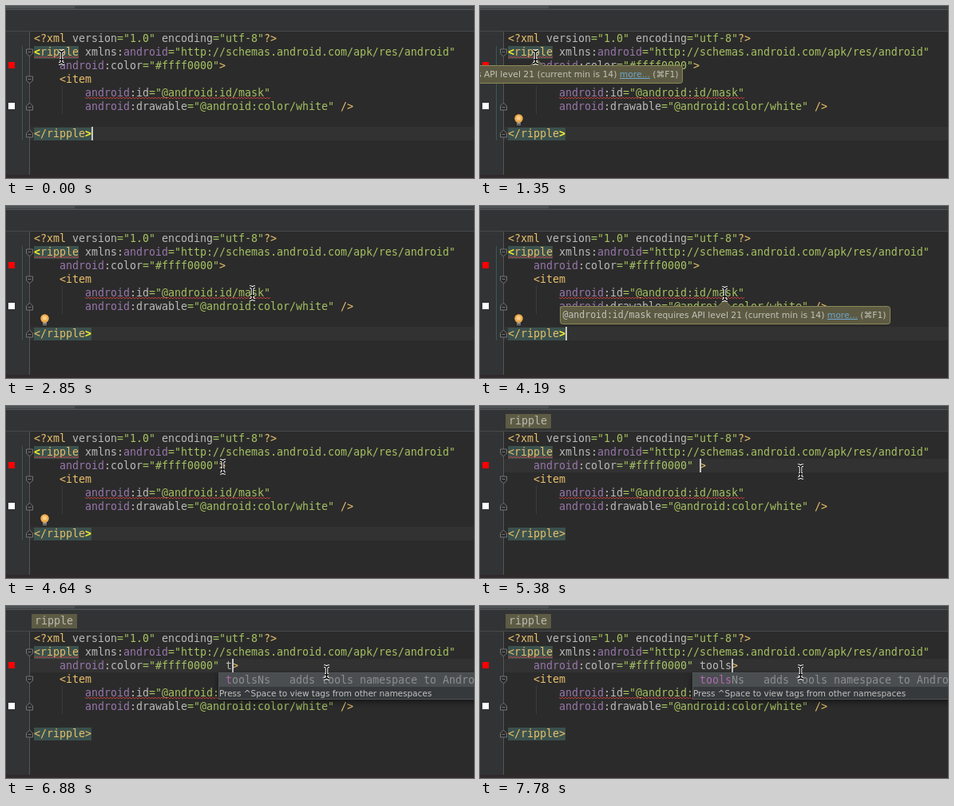
An HTML page with a canvas that plays this animation: 586 by 215 pixels, repeating every 8 s.

```html
<!DOCTYPE html>
<html lang="en">
<head>
<meta charset="utf-8">
<title>Code editor</title>
<style>
  html, body { margin: 0; width: 100%; height: 100%; overflow: hidden; background: #2b2b2b; }
  canvas { display: block; }
</style>
</head>
<body>
<canvas id="stage" width="586" height="215"></canvas>
<script>
const ctx = document.getElementById('stage').getContext('2d');
const LOOP = 8000, CHAR = 8, LEFT = 35, ROW = 17, FIRST_BASELINE = 45;
const mono = size => `${size}px "DejaVu Sans Mono", monospace`;
const sans = size => `${size}px "DejaVu Sans", sans-serif`;
const MONO = mono(13.29), BOLD = 'bold ' + MONO;
const TAG = '#e8bf6a', NS = '#9876aa', NAME = '#bababa', STR = '#a5c261', BRACE = '#ffef28';

const TYPED = [[6880, 't'], [7180, 'o'], [7330, 'o'], [7630, 'l'], [7780, 's']];
const CARET_TOGGLES = [450, 900, 1350, 1950, 2400, 3000, 3450, 3890, 4340, 4930, 6280, 6880];
const CLICK = 4930, BREADCRUMB = 5080, SPACE = 5380, POPUP = 5530, BULB = 300;

// Pointer positions, each held until the next: [time, x, y]
const POINTER = [
  [0, 69, 64], [2250, 84, 60], [2400, 150, 66], [2550, 232, 86], [2700, 290, 103],
  [2850, 308, 109], [3000, 307, 110], [4190, 306, 110], [4340, 294, 98], [4490, 277, 83],
  [4640, 271, 76], [5080, 318, 78], [5230, 372, 81], [5380, 401, 82], [6430, 401, 83]
];

const held = (keys, t) => keys.filter(k => k[0] <= t).pop();
const baseline = row => FIRST_BASELINE + row * ROW;

function rect(x, y, w, h, color) {
  ctx.fillStyle = color;
  ctx.fillRect(x, y, w, h);
}

function text(str, x, y, color, font = MONO) {
  ctx.font = font;
  ctx.fillStyle = color;
  ctx.fillText(str, x, y);
}

function textWidth(str, font) {
  ctx.font = font;
  return ctx.measureText(str).width;
}

function path(points, close = false) {
  ctx.beginPath();
  points.forEach(p => ctx.lineTo(...p));
  if (close) ctx.closePath();
}

function stroke(color, width = 1) {
  ctx.strokeStyle = color;
  ctx.lineWidth = width;
  ctx.stroke();
}

// Parts alternate text and colour; a yellow brace is drawn bold.
function codeLine(row, indent, ...parts) {
  let x = LEFT + indent * CHAR;
  for (let i = 0; i < parts.length; i += 2) {
    text(parts[i], x, baseline(row), parts[i + 1], parts[i + 1] === BRACE ? BOLD : MONO);
    x += parts[i].length * CHAR;
  }
}

function squiggle(row, x1, x2) {
  const points = [];
  for (let x = x1; x <= x2; x += 2) points.push([x, baseline(row) + ((x - x1) / 2 % 2 ? 3 : 1)]);
  path(points);
  stroke('#bc3f3c');
}

function foldMark(y, dir) {
  const x = 29.5;
  path([[x - 4, y - 4 * dir], [x + 4, y - 4 * dir], [x + 4, y + dir], [x, y + 5 * dir], [x - 4, y + dir]], true);
  ctx.fillStyle = '#2b2b2b';
  ctx.fill();
  stroke('#72757a');
  path([[x - 2, y - .5 * dir], [x + 2, y - .5 * dir]]);
  stroke('#72757a');
}

function disc(x, y, r, color) {
  ctx.fillStyle = color;
  ctx.beginPath();
  ctx.arc(x, y, r, 0, Math.PI * 2);
  ctx.fill();
}

function bulb() {
  disc(48.5, 140.5, 5.2, '#f0ad50');
  disc(48.5, 140, 2.6, '#f9d08c');
  rect(46, 146, 5, 1, '#c8c8c8');
  rect(46, 148, 5, 1, '#a0a0a0');
}

function tooltip(subject, subjectFont, left, right, top, tipX, alpha) {
  ctx.globalAlpha = alpha;
  const r = 3, bottom = top + 22;
  ctx.beginPath();
  ctx.moveTo(left + r, top);
  ctx.lineTo(tipX - 8, top);
  ctx.lineTo(tipX, top - 8);
  ctx.lineTo(tipX + 8, top);
  ctx.arcTo(right, top, right, bottom, r);
  ctx.arcTo(right, bottom, left, bottom, r);
  ctx.arcTo(left, bottom, left, top, r);
  ctx.arcTo(left, top, right, top, r);
  ctx.closePath();
  ctx.fillStyle = '#5c5a42';
  ctx.fill();
  stroke('#8c8858');

  const font = sans(10.75), y = top + 14.5;
  const parts = [
    [subject, '#c4c4bc', subjectFont],
    [' requires API level 21 (current min is 14) ', '#c4c4bc', font],
    ['more...', '#6fa5cf', font],
    [' (⌘F1)', '#c4c4bc', font]
  ];
  let x = right - 5 - parts.reduce((sum, [str, , f]) => sum + textWidth(str, f), 0);
  for (const [str, color, f] of parts) {
    const width = textWidth(str, f);
    text(str, x, y, color, f);
    if (str === 'more...') rect(x, Math.round(y) + 1, width, 1, color);
    x += width;
  }
  ctx.globalAlpha = 1;
}

function popup(typed) {
  const left = 266, width = typed ? 340 : 289;
  ctx.save();
  ctx.shadowColor = 'rgba(0, 0, 0, .5)';
  ctx.shadowBlur = 8;
  ctx.shadowOffsetY = 3;
  rect(left, 83, width, 34, '#515456');
  ctx.restore();
  rect(left + 1, 84, width - 2, 17, '#4b4e50');
  rect(left + 1, 101, width - 2, 15, '#36393b');
  const y = baseline(3) + 1;
  if (typed) {
    text('toolsNs   adds tools namespace to Android', 275, y, '#8c8f91');
    rect(275, 85, typed.length * CHAR, 15, '#4b4e50');
    text(typed, 275, y, '#b069b0');
  } else {
    text('android:radius', 275, y, '#8c8f91');
  }
  text('Press ^Space to view tags from other namespaces', 267, 113, '#c2c2c2', sans(10.45));
}

function pointer(x, y) {
  ctx.beginPath();
  for (const s of [-1, 1]) {
    ctx.moveTo(x - 3.5, y + 8 * s);
    ctx.quadraticCurveTo(x, y + 8 * s, x, y + 5 * s);
    ctx.quadraticCurveTo(x, y + 8 * s, x + 3.5, y + 8 * s);
  }
  ctx.moveTo(x, y - 6);
  ctx.lineTo(x, y + 6);
  ctx.moveTo(x - 2.5, y + 3);
  ctx.lineTo(x + 2.5, y + 3);
  stroke('#ffffff', 3.4);
  stroke('#000000', 1.5);
}

function chrome(t) {
  rect(0, 0, 586, 215, '#2b2b2b');
  rect(0, 0, 586, 31, '#313335');
  rect(0, 0, 586, 4, '#3c3f41');
  rect(0, 0, 86, 3, '#4b5052');
  rect(0, 4, 586, 1, '#515556');
  rect(0, 31, 29, 184, '#313335');
  rect(0, 31, 586, 1, '#464849');
  rect(30, t < CLICK ? 151 : 66, 556, 17, '#323232');
  rect(29, 32, 1, 179, '#555555');
  rect(0, 211, 586, 4, '#302a2b');
  rect(3, 70, 8, 8, '#ff0000');
  rect(3, 121, 8, 8, '#ffffff');
  if (t < CLICK) rect(20, 50, 1, 118, '#3b5a50');
  if (t >= BREADCRUMB) {
    rect(32, 10, 57, 18, '#5d5b43');
    text('ripple', 36, 23, '#bbbbb4');
  }
}

function code(t, typed) {
  const brace = t < CLICK ? BRACE : TAG;
  rect(LEFT, 50, 7 * CHAR, 16, '#3b514d');
  rect(LEFT, 152, 9 * CHAR, 16, '#3b514d');
  for (let y = 100; y < 135; y += 2) rect(70, y, 1, 1, '#4a4a4a');

  codeLine(0, 0, '<?xml ', TAG, 'version', NAME, '="1.0"', STR, ' encoding', NAME, '="utf-8"', STR, '?>', TAG);
  codeLine(1, 0, '<', brace, 'ripple ', TAG, 'xmlns:', NAME, 'android', NS,
    '="http://schemas.android.com/apk/res/android"', STR);
  codeLine(2, 4, 'android', NS, ':color', NAME, '="#ffff0000"', STR,
    (t >= SPACE ? ' ' : '') + typed, NAME, '>', TAG);
  codeLine(3, 4, '<item', TAG);
  codeLine(4, 8, 'android', NS, ':id', NAME, '="@android:id/mask"', STR);
  codeLine(5, 8, 'android', NS, ':drawable', NAME, '="@android:color/white"', STR, ' />', TAG);
  codeLine(7, 0, '</ripple', TAG, '>', brace);
  squiggle(1, 35, 91);
  squiggle(4, 99, 331);

  foldMark(58, 1);
  foldMark(92, 1);
  foldMark(126, -1);
  foldMark(160, -1);
}

function caret(t, typed) {
  if (CARET_TOGGLES.filter(at => at <= t).length % 2) return;
  const x = t < CLICK ? 107 : t < SPACE ? 267 : 275 + typed.length * CHAR;
  rect(x, t < CLICK ? 151 : 66, 2, 17, '#c8c8c8');
}

function draw(t) {
  const typed = TYPED.filter(k => k[0] <= t).map(k => k[1]).join('');
  chrome(t);
  code(t, typed);
  caret(t, typed);
  if (t >= BULB && t < CLICK) bulb();
  if (t >= 150 && t < 2400) tooltip('<ripple>', mono(11.5), -80, 253.5, 74.5, 71, t < 300 ? .5 : 1);
  if (t >= 3000 && t < 4340) tooltip('@android:id/mask', mono(11.5), 100.5, 513.5, 125.5, 306, 1);
  if (t >= POPUP) popup(typed);
  const [, x, y] = held(POINTER, t);
  pointer(x + .5, y);
}

const start = performance.now();
function frame() {
  draw((performance.now() - start) % LOOP);
  requestAnimationFrame(frame);
}
frame();
</script>
</body>
</html>
```
